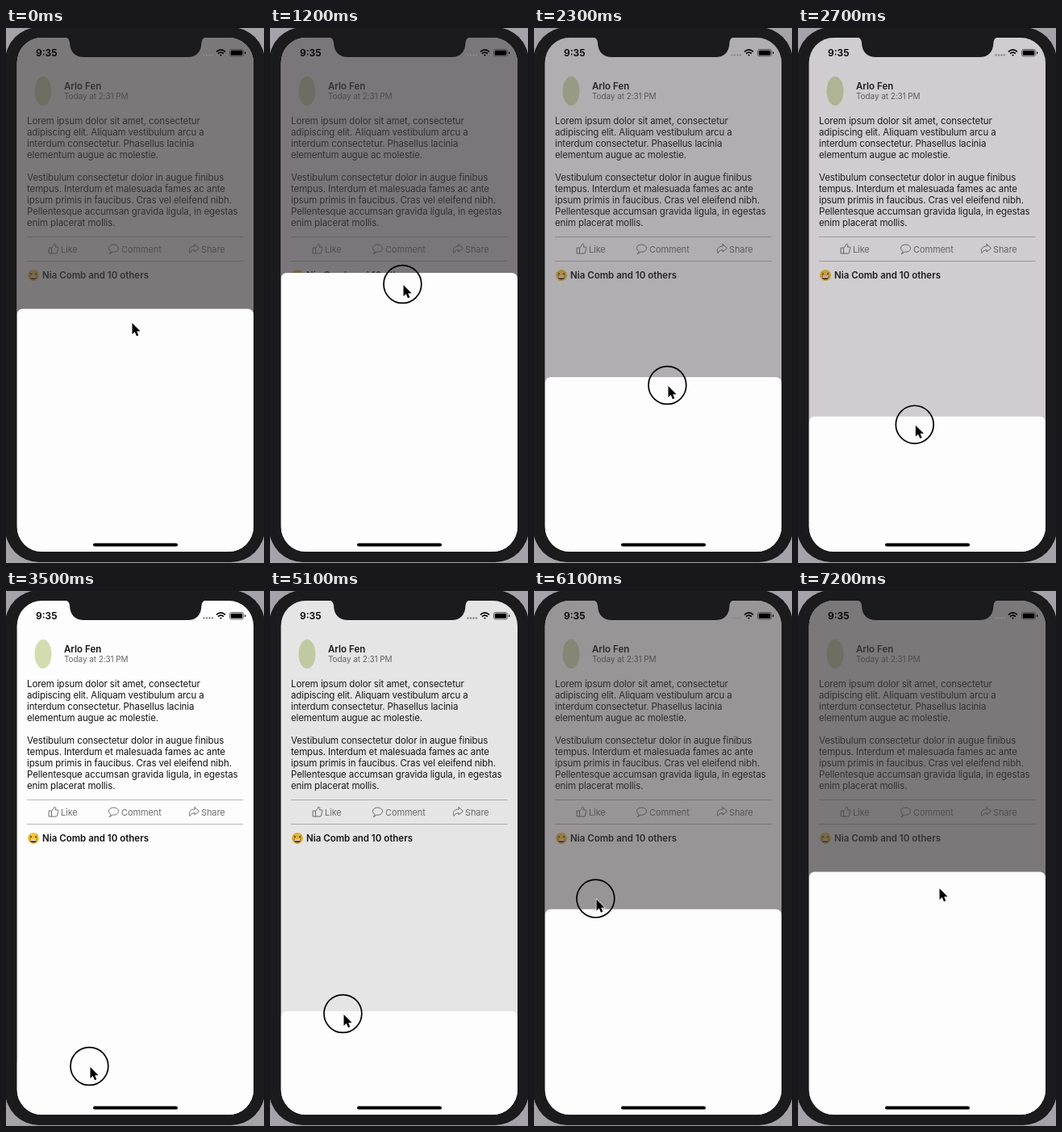
An HTML page for the animation above (7300 ms loop, 320x662 px).

```html
<!DOCTYPE html>
<html lang="en">
<head>
<meta charset="utf-8">
<title>Bottom card drag</title>
<style>
  html, body { margin: 0; width: 100%; height: 100%; overflow: hidden; background: #a5a3a9; }
  svg { display: block; width: 320px; height: 662px; }
  text { font: 11.5px Inter, sans-serif; letter-spacing: -.11px; fill: #111; white-space: pre; }
  .bold { font-weight: 600; letter-spacing: 0; }
  .time { font-size: 12px; fill: #000; }
  .date { font-size: 10px; letter-spacing: -.08px; fill: #666; }
  .action { font-size: 11px; letter-spacing: -.1px; fill: #707070; }
  .icon { fill: none; stroke: #707070; stroke-linejoin: round; stroke-linecap: round; }
</style>
</head>
<body>
<svg viewBox="0 0 320 662">
  <defs>
    <clipPath id="screen"><rect x="13.600" y="12" width="293.400" height="636" rx="31"/></clipPath>
  </defs>
  <rect x="-1" y="-1" width="322" height="662" rx="42" fill="#1b1a1c"/>

  <g clip-path="url(#screen)">
    <rect x="13" y="12" width="294" height="636" fill="#fefdfe"/>

    <!-- post -->
    <ellipse cx="46" cy="78" rx="10.500" ry="18" fill="#d3dcb0"/>
    <text class="bold" x="72" y="75.500">Arlo Fen</text>
    <text class="date" x="72" y="87.500">Today at 2:31 PM</text>
    <g id="post"></g>
    <path d="M26 258.500H294.500M26 288.500H294.500" stroke="#b9b8ba"/>

    <g class="icon">
      <path d="M53.500 272H56.500V279H53.500ZM56.500 272.500L59 269.500Q59.500 267 60.500 267Q62.500 267.500 61.500 271H64.500Q65.500 272 64.500 273.500L63.500 278Q63 279 62 279H56.500"/>
      <path d="M130 276.500Q127.500 275 127.500 272.500C127.500 266.500 139.500 266.500 139.500 272.500C139.500 276 136 277.500 132.500 277L128.500 279.500Z"/>
      <path d="M234 267.500L239.500 272.500L234 277V274.500Q229.500 274.500 228 278.500C226 273 229 270 234 270Z"/>
    </g>
    <text class="action" x="68" y="277.500">Like</text>
    <text class="action" x="143" y="277.500">Comment</text>
    <text class="action" x="242" y="277.500">Share</text>

    <circle cx="34" cy="306" r="7" fill="#f5c33b"/>
    <path d="M29.500 303L32 304.300L29.500 305.500M38.500 303L36 304.300L38.500 305.500" fill="none" stroke="#5a3a12"/>
    <path d="M29.500 307H38.500Q38 311.500 34 311.500T29.500 307Z" fill="#6b3a18"/>
    <path d="M30.500 307.300H37.500V309H30.500Z" fill="#fff"/>
    <text class="bold" x="45" y="310">Nia Comb and 10 others</text>

    <rect id="dim" x="13" y="12" width="294" height="636" fill="#443f43"/>
    <rect id="card" x="13.600" width="293.400" height="680" rx="7" fill="#fefdfe"/>

    <!-- status bar and home indicator -->
    <text class="bold time" x="37" y="35">9:35</text>
    <g fill="#8a898c">
      <circle cx="245.500" cy="33.500" r="1.200"/><circle cx="249" cy="33.500" r="1.200"/>
      <circle cx="252.500" cy="33.500" r="1.200"/><circle cx="256" cy="33.500" r="1.200"/>
    </g>
    <g fill="none" stroke="#000" stroke-width="1.700">
      <path d="M261 29.300Q266.500 24.300 272 29.300M263 31.700Q266.500 28.500 270 31.700"/>
      <path d="M265 33.300Q266.500 32 268 33.300L266.500 34.800Z" fill="#000" stroke="none"/>
    </g>
    <rect x="277.500" y="26.500" width="17" height="8.500" rx="2.300" fill="none" stroke="#444" stroke-width=".8"/>
    <rect x="278.700" y="27.700" width="14.600" height="6.100" rx="1.200"/>
    <path d="M296 29V32.500Q297.300 31.800 297.300 30.800T296 29Z"/>
    <rect x="108" y="637.500" width="105" height="4" rx="2"/>
  </g>

  <path d="M72 11Q78.500 12 79 18C79.500 30 86 36 97 36H225C236 36 242 30 242.500 18Q243 12 249 11Z" fill="#1b1a1c"/>

  <g id="pointer">
    <circle id="ring" cx="-.6" r="23.400" fill="none" stroke="#000" stroke-width="1.700"/>
    <path transform="translate(.5 1) scale(.9)" d="M0 0V15.500L3.600 12.200L6.100 18L8.700 16.900L6.300 11.300H11.200Z" stroke="#fff" stroke-width="1.400" paint-order="stroke"/>
  </g>
</svg>
<script>
const LOOP = 7300, STEP = 100;
const FULL_DIM_Y = 347, DIM_RANGE = 301, MAX_DIM = .7;
const PRESS = 500, RELEASE = 6200;

// time, pointer x, pointer y, card top
const KEYS = [
  [0, 156, 364, 347.5],
  [400, 156, 364, 347.5],
  [1200, 165, 317, 303],
  [1900, 166, 406, 394],
  [2300, 166, 442, 432],
  [3500, 104, 588, 578],
  [3900, 101, 599, 589],
  [4200, 101, 599, 589],
  [5100, 91, 523, 520],
  [5700, 85, 439, 449],
  [6200, 75, 366, 380],
  [6500, 73, 357, 347.5],
  [7100, 73, 357, 347.5],
  [7200, 175, 367, 347.5],
  [7300, 175, 367, 347.5],
];

const el = id => document.getElementById(id);

const post = `Lorem ipsum dolor sit amet, consectetur
adipiscing elit. Aliquam vestibulum arcu a
interdum consectetur. Phasellus lacinia
elementum augue ac molestie.

Vestibulum consectetur dolor in augue finibus
tempus. Interdum et malesuada fames ac ante
ipsum primis in faucibus. Cras vel eleifend nibh.
Pellentesque accumsan gravida ligula, in egestas
enim placerat mollis.`;
el('post').innerHTML = post.split('\n')
  .map((line, i) => `<text x="26" y="${119 + i * 14}">${line}</text>`).join('');

function poseAt(t) {
  const next = KEYS.findIndex(key => key[0] > t);
  const a = KEYS[next - 1], b = KEYS[next];
  let k = (t - a[0]) / (b[0] - a[0]);
  if (a[0] === RELEASE) k = 1 - (1 - k) ** 2;
  return a.map((v, i) => v + (b[i] - v) * k).slice(1);
}

function draw(now) {
  const t = Math.floor(now % LOOP / STEP) * STEP;
  const [x, y, top] = poseAt(t);
  const dim = MAX_DIM - (top - FULL_DIM_Y) / DIM_RANGE;
  el('card').setAttribute('y', top);
  el('dim').setAttribute('opacity', Math.max(0, Math.min(MAX_DIM, dim)));
  el('pointer').setAttribute('transform', `translate(${x} ${y})`);
  el('ring').setAttribute('visibility', t >= PRESS && t <= RELEASE ? 'visible' : 'hidden');
}

const start = performance.now();
function frame() {
  draw(performance.now() - start);
  requestAnimationFrame(frame);
}
frame();
</script>
</body>
</html>
```
